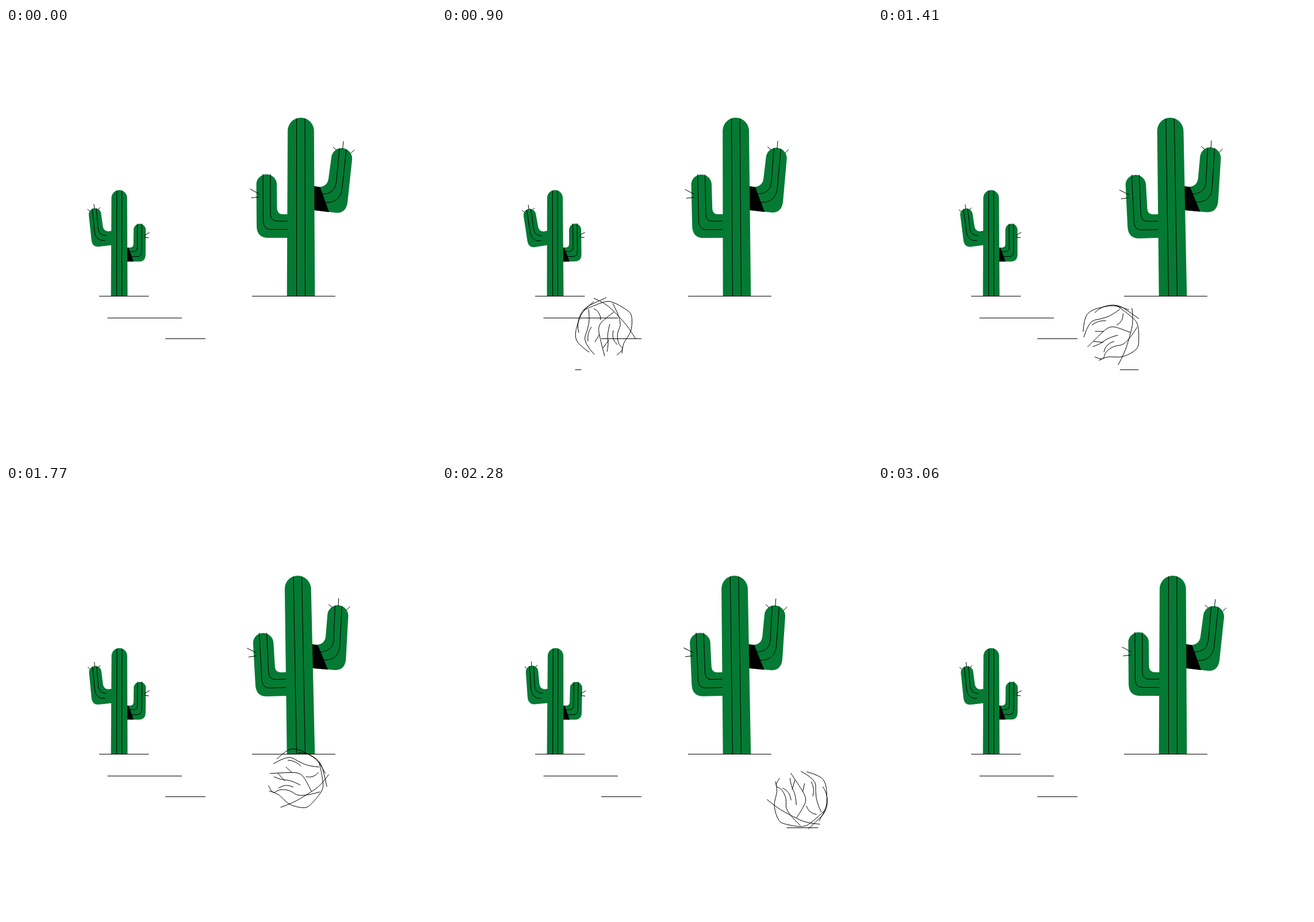
Write an HTML page that moves like this. It is 748 by 748 pixels and loops after 3090 ms.

```html
<!DOCTYPE html>
<html lang="en">
<head>
<meta charset="utf-8">
<title>Desert</title>
<style>
html, body { margin: 0; width: 100%; height: 100%; overflow: hidden; background: #fff; }
svg { display: block; width: 100vw; height: 100vh; }
path { vector-effect: non-scaling-stroke; }
.line { fill: none; stroke: #000; stroke-width: 1; }
.green { fill: #057a34; }
</style>
</head>
<body>
<svg viewBox="0 0 748 748">
  <defs><clipPath id="view"><rect x="71" width="605" height="748"/></clipPath></defs>
  <g id="cacti"></g>
  <path class="line" d="M162 466.5H248.500M428 466.5H573M176.500 504.5H306M277 540.5H347"/>
  <path class="line" id="shadow"/>
  <g clip-path="url(#view)"><path class="line" id="weed"/></g>
</svg>
<script>
const LOOP = 3090, STEP = 30, GROUND = 547;
const $ = id => document.getElementById(id);
const wave = (t, peak) => Math.cos((t - peak) / LOOP * 2 * Math.PI);

const shade = {
  bent: 'M528 274L546.500 277L562 320.300L528 316Z',
  straight: 'M498 324H486L471 365H498Z'
};

// One cactus: the bent arm is on the right, the straight arm on the left.
function cactus(place, shaded) {
  const dark = arm => arm === shaded ? `<path d="${shade[arm]}"/>` : '';
  return `<g transform="${place}"><g class="sway">
    <g class="straight">
      <path class="green" d="M498 365H456Q436.500 365 436 345L435.500 271A17.800 17.800 0 0 1 471 271L471.500 314Q472 324 482 324H498Z"/>
      <path class="line" d="M447 254L447.500 337Q448 350.500 461 350.500H498M460 254.500V324Q460.500 336 472 336H498"/>
      ${dark('straight')}
      <path class="line" d="M424.500 280L441 289M426.500 295.500L440 294"/>
    </g>
    <g class="bent">
      <path class="green" d="M528 274L546 276.500Q559 275 561 262L566 225A18 18 0 0 1 602 229L594 304Q591 322 575 321.500L528 316Z"/>
      <path class="line" d="M580 209.500L574.500 269Q572 289 550 289M592 211L584.500 281Q580 305 555 303.500"/>
      ${dark('bent')}
      <path class="line" d="M569 207L575 212.500M587 197L585.500 211M606 212L599.500 218"/>
    </g>
    <path class="green" d="M488.700 467L490 179A22.900 22.900 0 0 1 535.800 179L537.300 467Z"/>
    <path class="line" d="M505.500 157.500V467M520 157.500L520.500 467"/>
  </g></g>`;
}

$('cacti').innerHTML =
  cactus('translate(197 467) scale(-.595 .595) translate(-513 -467)', 'straight') +
  cactus('', 'bent');

// Sway amounts in radians
const sways = [
  { peak: 2365, side: -1, trunk: .003, bent: .038, straight: .013 },
  { peak: 240, side: 1, trunk: .0094, bent: .018, straight: .0165 }
];
[...document.querySelectorAll('.sway')].forEach((g, i) => {
  Object.assign(sways[i], { g, bentArm: g.querySelector('.bent'), straightArm: g.querySelector('.straight') });
});

function sway(c, t) {
  const w = c.side * (wave(t, c.peak) - wave(0, c.peak));
  const k = c.trunk * w, deg = a => a * w * 180 / Math.PI;
  c.g.setAttribute('transform', `matrix(1 0 ${-k} 1 ${k * 467} 0)`);
  c.bentArm.setAttribute('transform', `rotate(${deg(c.bent)} 537 298)`);
  c.straightArm.setAttribute('transform', `rotate(${deg(c.straight)} 490 345)`);
}

// Tumbleweed twigs around its centre, "x,y" points softened at the joints
const twigs = `-18,-45 -37,-30 -46,-8 -51,13 -46,29 -26,43
-44,9 -48,-5 -37,-33 -12,-45 4,-52
-36,-30 -1,-46 15,-45 38,-32 49,-23 48,5 40,18 32,30 31,45
-18,-51 3,-42 23,-22 43,0 55,20
-27,-32 -25,-15 -29,5 -37,25 -17,47
-18,-33 -6,-27 -6,-13
17,-27 1,-15 -11,-2 -7,20 1,50
15,-42 32,-10 22,10 25,30 36,38 22,48
10,-6 5,12 8,28 5,42
-22,-1 -30,10 -28,24
16,5 12,20 23,30
-16,25 -8,12
-2,36 8,22`;

function soften(row) {
  const p = row.split(' ').map(s => s.split(',').map(Number));
  let d = 'M' + p[0];
  for (let i = 1; i < p.length - 1; i++) {
    const [x, y] = p[i], [u, v] = p[i + 1];
    d += `Q${x} ${y} ` + (i === p.length - 2 ? `${u} ${v}` : `${(x + u) / 2} ${(y + v) / 2}`);
  }
  return p.length > 2 ? d : d + 'L' + p[1];
}
$('weed').setAttribute('d', twigs.split('\n').map(soften).join(''));

const track = [[0, 12], [570, 187], [900, 282], [1410, 407], [1770, 508], [2285, 625], [2730, 722], [LOOP, 805]];
const landings = [[745, 237], [1515, 437], [2285, 627]];

function weedX(t) {
  const i = track.findIndex(k => k[0] > t);
  const [t0, x0] = track[i - 1], [t1, x1] = track[i];
  return x0 + (x1 - x0) * (t - t0) / (t1 - t0);
}

function weedY(t) {
  if (t < 745) return 430 + .00049 * (t - 255) ** 2;
  if (t < 2285) return GROUND - 44 * Math.abs(Math.sin(Math.PI * (t - 745) / 770));
  return GROUND - 90 * Math.sin(Math.PI * (t - 2285) / 900);
}

function draw(now) {
  const t = Math.floor(now % LOOP / STEP) * STEP;
  sways.forEach(c => sway(c, t));
  const turn = (t - 900) * 360 / LOOP;
  $('weed').setAttribute('transform', `translate(${weedX(t)} ${weedY(t)}) rotate(${turn})`);
  $('shadow').setAttribute('d', landings.map(([at, x]) => {
    const half = 27.5 * (1 - (Math.abs(t - at) / 177) ** 1.7);
    return half > 0 ? `M${x - half} 594.5H${x + half}` : '';
  }).join(''));
  requestAnimationFrame(() => draw(performance.now()));
}
draw(0);
</script>
</body>
</html>
```
